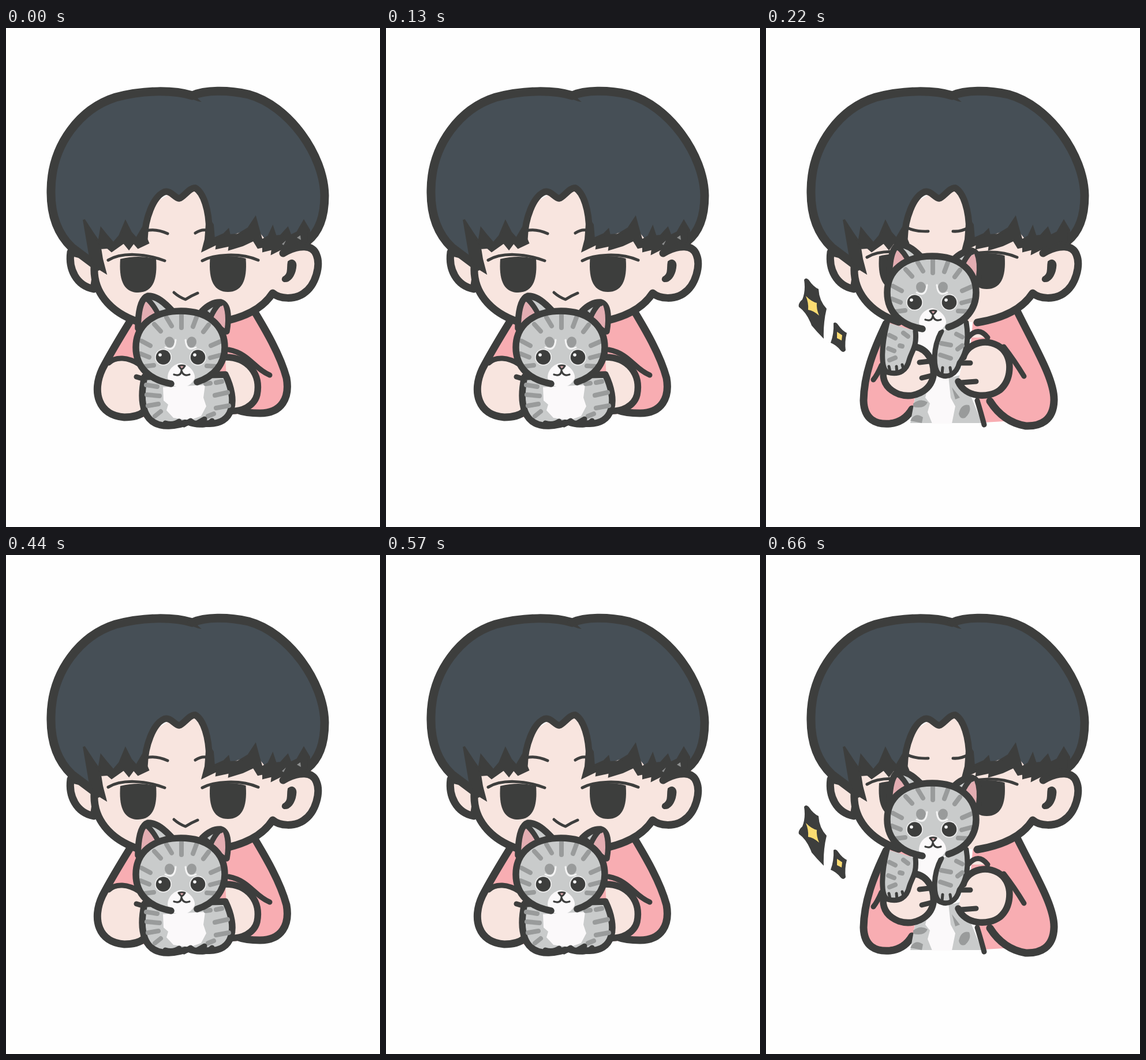
An HTML page that plays this animation: 648x864 px, repeating every 880 ms.

```html
<!DOCTYPE html>
<html lang="en">
<head>
<meta charset="utf-8">
<title>Hugging a kitten</title>
<style>
html, body { margin: 0; width: 100%; height: 100%; overflow: hidden; background: #fefefe; }
svg { display: block; width: 100%; height: 100%; }
path { stroke-linecap: round; stroke-linejoin: round; }
.line { fill: none; stroke: #3d3e3d; stroke-width: 13; }
.bold { stroke-width: 15; }
.cat { stroke-width: 11.5; }
.mid { stroke-width: 9; }
.thin { stroke-width: 5; }
.fine { stroke-width: 3.2; }
.ink { fill: #3d3e3d; }
.tuft { stroke: #3d3e3d; stroke-width: 4; stroke-linejoin: miter; }
.hair { fill: #464f56; }
.skin { fill: #f8e5df; }
.pink { fill: #f8adb2; }
.fur { fill: #c9cbcb; }
.white { fill: #fbf9fa; }
.ear { fill: #e3adb2; }
.spot { fill: #999b9b; }
.stripe { fill: none; stroke: #999b9b; stroke-width: 8; }
.gold { fill: #fbdc72; }
</style>
</head>
<body>
<svg viewBox="0 0 648 864">
  <!-- resting: body -->
  <g class="rest">
    <path class="pink" d="M218 500C200 535 180 565 168 590C148 630 160 672 205 675L440 667C478 667 492 640 486 606C475 565 448 520 430 486Z"/>
    <path class="skin" d="M172 588C185 566 215 570 240 590V670C200 680 150 662 160 610Z"/>
    <path class="line" d="M216 506C198 535 180 565 167 590C148 630 160 671 205 674Q228 674 240 664M430 490C448 520 475 565 486 606C492 640 478 667 440 667Q415 667 400 661"/>
    <path class="line mid" d="M178 580C190 568 212 570 230 582"/>
    <path class="skin line cat" d="M380 570C420 570 442 600 435 635C430 655 408 665 385 663"/>
    <path class="line mid" d="M386 557C422 564 430 590 457 601"/>
  </g>

  <!-- lifting: body -->
  <g class="lift">
    <path class="pink" d="M208 500C185 560 170 600 169 645C170 678 190 688 215 685C245 680 255 662 258 640V500Z"/>
    <path class="line" d="M208 512C185 560 170 600 169 645C170 678 190 687 215 685Q240 682 253 660"/>
    <path class="line mid" d="M186 609Q192 602 200 584"/>
    <path class="pink" d="M360 490H436C470 560 500 610 499 645C498 680 475 690 450 689Q428 686 412 681L378 683L350 600Z"/>
    <path class="line" d="M436 492C470 560 500 610 499 645C498 680 475 690 450 689C420 684 400 665 388 646"/>
    <path class="line mid" d="M412 552Q430 575 447 603"/>
  </g>

  <!-- head -->
  <path class="skin line" d="M112 388C108 418 122 446 152 452L160 400Z"/>
  <path class="skin" d="M152 410C151 455 178 492 230 509H380C420 499 445 482 462 459C475 470 500 470 515 460C538 445 545 410 538 393L520 350L330 260L160 360Z"/>
  <path class="line" d="M153 414C151 455 178 492 230 509M366 510C415 502 446 484 462 459C475 470 500 470 515 460C538 445 545 410 538 393C532 375 508 374 480 390"/>
  <path class="ink tuft" d="M490 405C496 400 503 404 501 415C499 429 491 439 482 438C478 436 480 432 484 430C491 425 488 414 490 405Z"/>

  <g id="face">
    <path id="eye" class="ink" d="M198 400Q230 392 260 400C263 440 252 458 229 458C206 458 195 440 198 400Z"/>
    <use href="#eye" x="155.5" y="-1"/>
    <path class="line thin" d="M177 402C200 388 240 390 275 403M340 403C360 392 405 388 437 402"/>
    <path class="line thin" d="M291 458Q300 466 311 470Q320 464 332 459"/>
  </g>
  <path class="line thin rest" d="M243 351Q260 347 280 356M328 355Q340 347 351 351"/>
  <path class="line thin lift" d="M245 346Q260 353 281 352M324 352Q338 353 350 346"/>

  <path class="hair" d="M114 380C92 358 78 325 79 280C80 200 130 140 190 121C240 108 290 108 323 118C345 108 385 108 420 116C490 135 551 220 552 290C552 330 540 355 520 370L459 378L432 345L352 372C354 330 345 287 328 277C318 276 308 293 300 295C292 294 285 280 274 284C255 292 241 330 240 362L210 365L182 378L158 370L164 415Z"/>
  <path class="line bold" d="M158 413L114 380C91 358 77 325 78 280C79 200 130 139 190 120C240 107 290 107 323 117C345 107 385 107 420 115C490 134 551 220 552 290C552 330 540 355 522 369"/>
  <path class="ink" d="M318 112L326 111Q328 120 339 128Q324 126 314 117Z"/>
  <path class="line cat" d="M240 364C241 330 255 292 274 284C285 280 292 294 300 295C308 293 318 276 328 277C342 285 352 315 352 352"/>
  <path class="ink tuft" d="M135 332L152 358L161 371L165 348L174 359L186 373L197 360L207 336L216 354L226 365L236 348L246 372L229 380L221 371L213 382L204 371L183 386L176 380L163 381L166 400L172 423L148 408Z"/>
  <path class="ink tuft" d="M349 327L358 341L360 365L378 357L385 350L387 359L402 358L420 347L432 329L438 351L443 368L455 361L462 346L467 361L476 360L488 347L493 360L505 354L516 335L525 350L524 374L508 371L492 379L475 383L461 390L462 382L446 386L446 378L437 380L429 367L410 376L387 383L388 376L365 381L366 373L341 385L346 366Z"/>
  <path class="rest" fill="#8b8d8d" d="M478 374L485 368L481 376ZM504 363L510 359L511 367Z"/>

  <!-- resting: kitten body -->
  <g class="rest">
    <path class="fur line cat" d="M240 604C230 650 238 690 282 689Q300 688 316 682Q330 688 348 685C395 688 402 645 380 600Z"/>
    <path class="white" d="M272 622L345 618L342 640L347 655L338 672L318 679L290 675L278 662L281 652L273 645Z"/>
    <path class="stripe" d="M243 618L262 621M244 635L266 637M246 654L264 651M258 672L268 664M346 616L354 615M364 614L374 612M362 636L384 631M364 658L386 654M350 672L360 668"/>
    <path class="line mid" d="M276 684Q290 688 300 681M308 687L320 680L328 686L344 677M340 687Q350 687 357 680M226 604L236 607"/>
  </g>

  <!-- lifting: kitten body and hands -->
  <g class="lift">
    <path class="fur" d="M250 684L262 620L340 600L374 684Z"/>
    <path class="white" d="M284 606L316 602L320 640L328 655L322 685H288L280 665L284 650L276 640Z"/>
    <path class="spot" d="M255 650Q268 640 280 648Q275 660 255 656ZM250 680Q258 664 272 674L270 684ZM334 668Q338 650 352 653Q357 664 345 675Q336 678 334 668ZM322 622L336 640L328 643Z"/>
    <path class="white" d="M250 518H305V560H260Z"/>
    <path class="line mid" d="M366 645Q373 668 378 687"/>
    <path class="skin line mid" d="M350 536Q368 515 384 536"/>
    <path class="skin line cat" d="M258 552C282 556 292 580 290 602C285 630 255 642 230 634C210 626 202 612 203 595Z"/>
    <path class="skin line cat" d="M342 570C350 543 387 535 410 556C428 575 425 610 405 627C385 642 345 640 333 612"/>
    <path class="line mid" d="M266 579L283 577M270 606L286 602M338 580L354 580M338 614L364 612"/>
    <path class="fur line mid" d="M210 510C200 550 198 588 210 596C232 602 244 592 248 575C252 560 262 552 259 525"/>
    <path class="fur line mid" d="M304 525C288 555 290 588 299 599C314 608 330 600 335 580C348 562 352 540 347 510"/>
    <path class="stripe" d="M214 532L224 537M238 528L246 534M212 555L222 559M232 550L236 551M214 575L224 571M304 546L320 549M330 530L340 535M302 566L320 572M332 556L340 550"/>
    <path class="line thin" d="M213 586L215 595M226 586L227 597M236 583L239 593M306 588L305 599M319 588L321 600"/>
  </g>

  <!-- kitten head -->
  <g id="kitten">
    <g id="ears">
      <path class="fur line cat" d="M229 520C229 490 234 468 246 464C262 464 275 476 288 490Z"/>
      <path class="ear" d="M234 516Q235 485 242 474Q256 480 264 500Z"/>
      <path class="line mid" d="M243 468Q254 476 264 496"/>
      <path class="fur line cat" d="M382 525C387 495 383 478 372 475C360 474 350 480 340 490Z"/>
      <path class="ear" d="M358 505Q364 486 376 480Q382 495 379 520Z"/>
      <path class="line mid" d="M370 477Q361 486 355 500"/>
    </g>
    <path class="fur" d="M225 553C225 515 255 490 303 490C350 490 379 515 379 553C380 590 345 616 303 620C260 616 226 590 225 553Z"/>
    <path class="stripe" d="M304 497L304 519M278 501L287 516M330 501L324 517M257 513L268 525M351 514L342 526M235 542L250 550M233 564L248 570M240 586L256 584M371 543L355 550M373 566L354 571M366 586L348 585"/>
    <path class="white" d="M303 580C315 582 328 594 327 606Q320 622 303 622Q284 621 280 606C280 592 290 582 303 580Z"/>
    <g id="cheek">
      <ellipse class="spot" cx="283.5" cy="544" rx="8.5" ry="9.5" transform="rotate(-15 283 544)"/>
      <path fill="none" stroke="#f4f4f4" stroke-width="3" d="M276 553Q292 562 294 540"/>
      <circle cx="272.5" cy="570" r="14.5" fill="#eee"/>
      <circle class="ink" cx="272.5" cy="570" r="12.8"/>
    </g>
    <use href="#cheek" transform="matrix(-1 0 0 1 605 0)"/>
    <circle cx="267" cy="566" r="2.8" fill="#fff"/>
    <circle cx="327" cy="566" r="2.8" fill="#fff"/>
    <path class="ear line fine" d="M299 585Q305 583 310 585Q307 590 304 591Z"/>
    <path class="line fine" d="M291 600Q303 604 304 593Q307 604 318 600"/>
    <path class="line cat" d="M286 616C250 610 225 588 225 553C225 515 255 490 303 490C350 490 379 515 379 553C379 582 360 604 331 613"/>
  </g>

  <!-- sparkles -->
  <g class="lift">
    <path class="ink" d="M66 436Q69 431 74 436Q82 448 91 452Q92 472 105 486Q99 510 100 538Q88 526 79 515Q71 493 57 483Q55 477 63 470Q69 455 66 436Z"/>
    <path class="gold" d="M69 464Q79 474 88 476Q87 486 92 498Q82 489 73 488Q74 476 69 464Z"/>
    <path class="ink" d="M117 511Q121 508 125 514Q132 524 140 528Q136 543 138 558Q134 564 129 558Q122 549 112 545Q118 529 117 511Z"/>
    <path class="gold" d="M123 526L132 532L131 541L123 537Z"/>
  </g>
</svg>
<script>
const HOLD = 220;
const show = (q, on) => document.querySelectorAll(q).forEach(e => e.style.display = on ? "" : "none");
const move = (id, x, y) => document.getElementById(id).setAttribute("transform", `translate(${x} ${y})`);

function draw(now) {
  const up = Math.floor(now / HOLD) % 2;
  show(".rest", !up);
  show(".lift", up);
  move("face", -2 * up, -5 * up);
  move("kitten", -15 * up, -95 * up);
  move("ears", 0, 6 * up);
  requestAnimationFrame(draw);
}
draw(performance.now());
</script>
</body>
</html>
```
